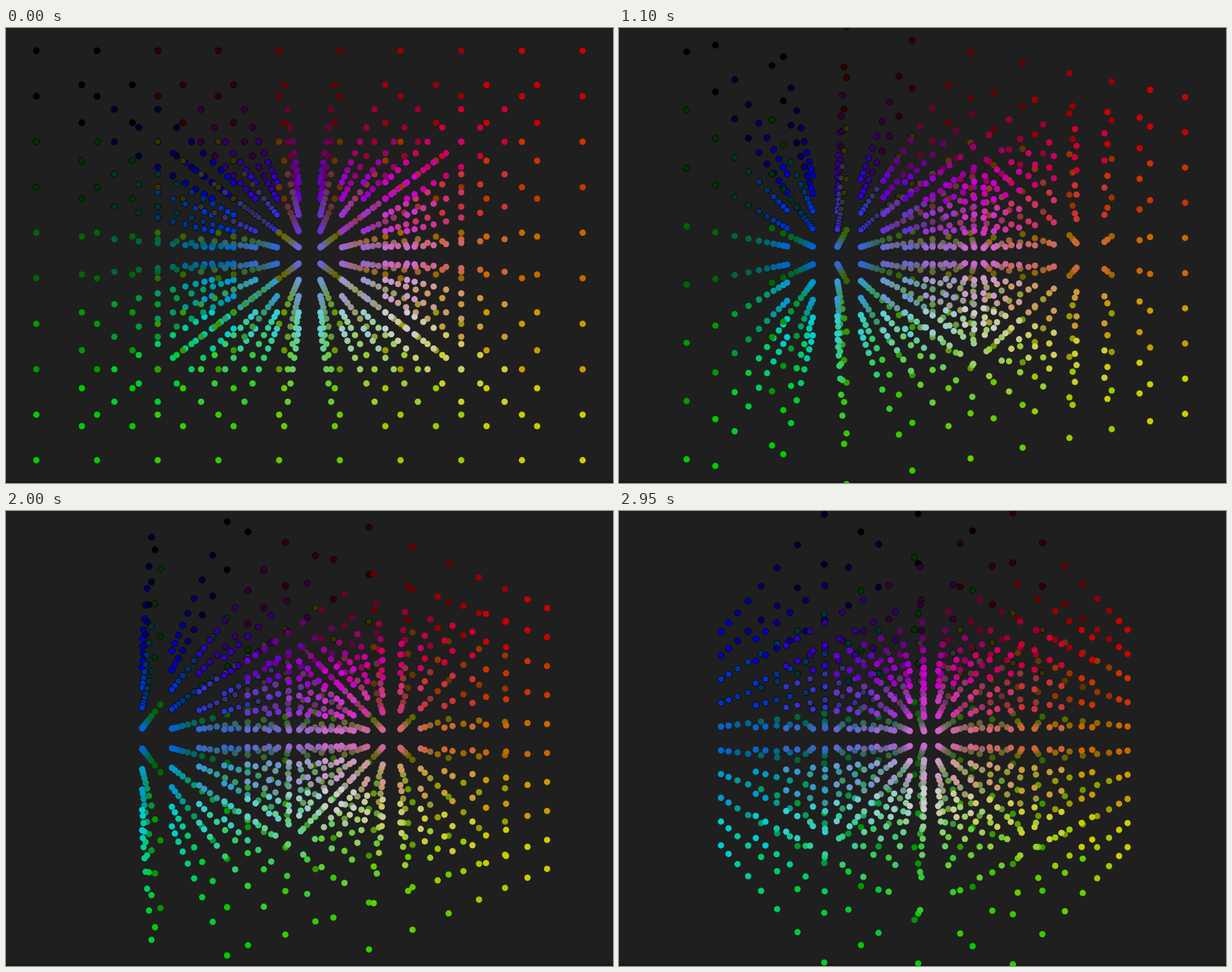
Write an HTML page with a canvas that moves like this. It is 864x648 px and loops after 3 s.

```html
<!DOCTYPE html>
<html lang="en">
<head>
<meta charset="utf-8">
<title>Rotating colour cube</title>
<style>
  html, body { margin: 0; width: 100%; height: 100%; overflow: hidden; background: #1f1f1f; }
  canvas { display: block; }
</style>
</head>
<body>
<canvas id="stage" width="864" height="648"></canvas>
<script>
  const W = 864, H = 648;
  const N = 10;                // points along each edge
  const HALF = (N - 1) / 2;
  const FOCAL = 5;             // eye to front face, in grid steps
  const RADIUS = 4.5;
  const STEP_MS = 50, STEPS = 60, STEP_DEG = 0.75;

  const ctx = document.getElementById('stage').getContext('2d');
  const level = n => Math.floor(n / 2) * 51;

  const points = [];
  for (let i = 0; i < N; i++)
    for (let j = 0; j < N; j++)
      for (let k = 0; k < N; k++) {
        const r = level(i), g = level(j), b = level(k);
        points.push({
          x: i - HALF, y: j - HALF, z: k - HALF,
          color: `rgb(${r},${g},${b})`,
          dark: r <= 51 && g <= 51
        });
      }

  function drawDot(x, y, p) {
    ctx.beginPath();
    ctx.arc(x, y, RADIUS, 0, Math.PI * 2);
    ctx.fillStyle = p.color;
    ctx.fill();
    if (p.dark) ctx.stroke();
  }

  function draw(step) {
    const angle = step * STEP_DEG * Math.PI / 180;
    const cos = Math.cos(angle), sin = Math.sin(angle);

    ctx.fillStyle = '#1f1f1f';
    ctx.fillRect(0, 0, W, H);
    ctx.fillStyle = '#1c171a';
    ctx.fillRect(0, H - 3, W, 3);

    ctx.strokeStyle = 'rgba(0,0,0,.8)';
    ctx.lineWidth = 1;
    for (const p of points) {
      const x = p.x * cos - p.z * sin;
      const z = p.x * sin + p.z * cos;
      const scale = FOCAL / (FOCAL + HALF + z);
      drawDot(W / 2 + x * scale * W / N, H / 2 + p.y * scale * H / N, p);
    }
  }

  const start = performance.now();
  let last = -1;
  function tick() {
    const step = Math.floor((performance.now() - start) / STEP_MS) % STEPS;
    if (step !== last) draw(last = step);
    requestAnimationFrame(tick);
  }
  tick();
</script>
</body>
</html>
```
